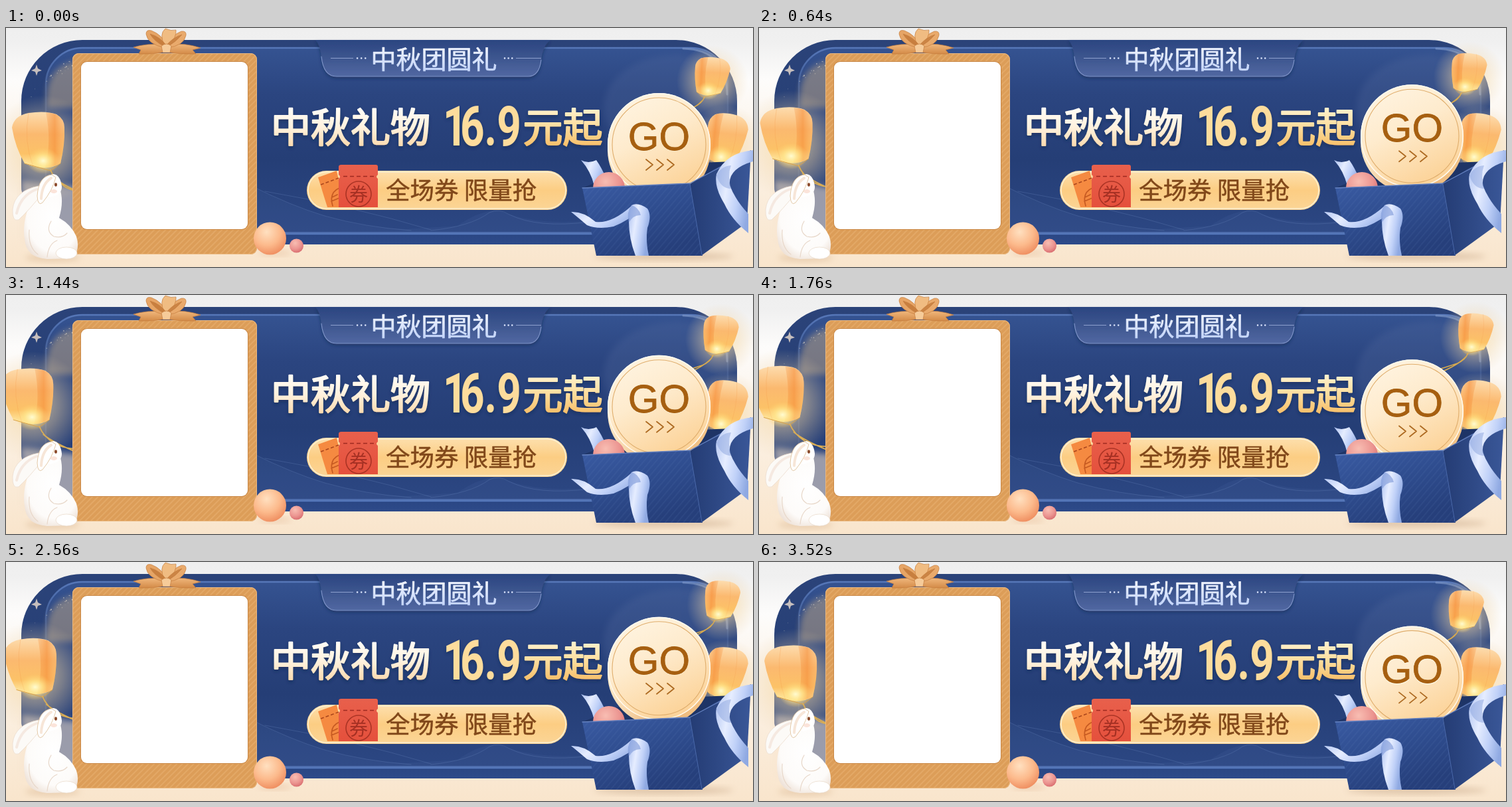
Animation, 1125 px wide and 360 px high, one loop 3600 ms. Source, as an HTML page:

```html
<!DOCTYPE html>
<html lang="zh-CN">
<head>
<meta charset="utf-8">
<title>中秋团圆礼</title>
<style>
  html, body { margin: 0; width: 100%; height: 100%; overflow: hidden; }
  svg { display: block; width: 1125px; height: 360px; }
  text { font-family: "Noto Sans CJK SC", "Noto Sans CJK", sans-serif; stroke-linejoin: round; }
  .big { font-size: 60px; stroke-width: 2.2px; }
  .num { font: 700 84px Roboto, sans-serif; }
  .go { font: 60px "Liberation Sans", Arial, sans-serif; text-anchor: middle; }
  .line { fill: none; stroke-linecap: round; stroke-linejoin: round; }
</style>
</head>
<body>
<svg viewBox="0 0 1125 360" xmlns="http://www.w3.org/2000/svg">
<defs>
  <linearGradient id="sky" x2="0" y2="1">
    <stop offset="0" stop-color="#efefef"/><stop offset=".06" stop-color="#f0f0f0"/>
    <stop offset=".22" stop-color="#fdfcfb"/><stop offset=".45" stop-color="#fcf4ea"/>
    <stop offset="1" stop-color="#f9e5cc"/>
  </linearGradient>
  <linearGradient id="rim" x2="0" y2="1">
    <stop offset="0" stop-color="#2b4379"/><stop offset=".5" stop-color="#263f76"/><stop offset="1" stop-color="#2d4a8a"/>
  </linearGradient>
  <linearGradient id="night" x2="0" y2="1">
    <stop offset="0" stop-color="#355391"/><stop offset=".25" stop-color="#2b4580"/>
    <stop offset=".6" stop-color="#253e76"/><stop offset="1" stop-color="#2c4783"/>
  </linearGradient>
  <linearGradient id="edge" x2="0" y2="1">
    <stop offset="0" stop-color="#5677b8"/><stop offset=".3" stop-color="#48659f" stop-opacity=".5"/>
    <stop offset=".8" stop-color="#48659f" stop-opacity=".3"/><stop offset="1" stop-color="#587bc0"/>
  </linearGradient>
  <linearGradient id="tab" x2="0" y2="1">
    <stop offset="0" stop-color="#2b4581"/><stop offset=".5" stop-color="#3d568f"/><stop offset="1" stop-color="#5268a2"/>
  </linearGradient>
  <linearGradient id="ice" gradientUnits="userSpaceOnUse" x1="0" y1="30" x2="0" y2="64">
    <stop offset="0" stop-color="#f0f4ff"/><stop offset="1" stop-color="#c5d6fb"/>
  </linearGradient>
  <linearGradient id="cream" gradientUnits="userSpaceOnUse" x1="0" y1="118" x2="0" y2="180">
    <stop offset="0" stop-color="#fffdf8"/><stop offset=".5" stop-color="#fff2df"/><stop offset="1" stop-color="#fbd9ac"/>
  </linearGradient>
  <linearGradient id="gold" gradientUnits="userSpaceOnUse" x1="0" y1="118" x2="0" y2="180">
    <stop offset="0" stop-color="#fff3d2"/><stop offset=".5" stop-color="#fddd9d"/><stop offset="1" stop-color="#f6bd66"/>
  </linearGradient>
  <linearGradient id="pill" x2="0" y2="1">
    <stop offset="0" stop-color="#fde0ae"/><stop offset=".5" stop-color="#fccd83"/><stop offset="1" stop-color="#fbd596"/>
  </linearGradient>
  <linearGradient id="red" x2="0" y2="1">
    <stop offset="0" stop-color="#e8604c"/><stop offset="1" stop-color="#e5503c"/>
  </linearGradient>
  <linearGradient id="face" x2=".5" y2="1">
    <stop offset="0" stop-color="#fff6e6"/><stop offset=".5" stop-color="#feebcd"/><stop offset="1" stop-color="#fcd49b"/>
  </linearGradient>
  <linearGradient id="side">
    <stop offset="0" stop-color="#fdeaca"/><stop offset=".5" stop-color="#eab273"/><stop offset="1" stop-color="#f3c68b"/>
  </linearGradient>
  <linearGradient id="paper" x2="0" y2="1">
    <stop offset="0" stop-color="#fddcae"/><stop offset=".4" stop-color="#fbb96f"/><stop offset=".75" stop-color="#fcc267"/><stop offset="1" stop-color="#fff0ae"/>
  </linearGradient>
  <linearGradient id="fold">
    <stop offset="0" stop-color="#f58e38" stop-opacity=".2"/><stop offset=".5" stop-color="#f58b36" stop-opacity=".6"/><stop offset="1" stop-color="#f9ab5d" stop-opacity=".2"/>
  </linearGradient>
  <radialGradient id="flame">
    <stop offset="0" stop-color="#fffbd0"/><stop offset=".45" stop-color="#ffe68c" stop-opacity=".75"/><stop offset="1" stop-color="#ffd070" stop-opacity="0"/>
  </radialGradient>
  <radialGradient id="glow">
    <stop offset="0" stop-color="#ffe5aa" stop-opacity=".75"/><stop offset=".5" stop-color="#f3d7a6" stop-opacity=".42"/><stop offset="1" stop-color="#ead2ac" stop-opacity="0"/>
  </radialGradient>
  <radialGradient id="peach" cx=".4" cy=".3" r=".75">
    <stop offset="0" stop-color="#ffe0c0"/><stop offset=".55" stop-color="#fcba8c"/><stop offset="1" stop-color="#ee8a5c"/>
  </radialGradient>
  <radialGradient id="pink" cx=".4" cy=".3" r=".75">
    <stop offset="0" stop-color="#f8bdb2"/><stop offset=".6" stop-color="#eb9490"/><stop offset="1" stop-color="#d7696c"/>
  </radialGradient>
  <radialGradient id="fur" cx=".55" cy=".4" r=".65">
    <stop offset="0" stop-color="#fff"/><stop offset=".75" stop-color="#fdfbf9"/><stop offset="1" stop-color="#efe3d9"/>
  </radialGradient>
  <linearGradient id="front" x2=".5" y2="1">
    <stop offset="0" stop-color="#3a5ba3"/><stop offset=".5" stop-color="#2f4d8f"/><stop offset="1" stop-color="#263f7b"/>
  </linearGradient>
  <linearGradient id="flank">
    <stop offset="0" stop-color="#243c74"/><stop offset="1" stop-color="#3a5798"/>
  </linearGradient>
  <linearGradient id="silk" x2="1" y2=".4">
    <stop offset="0" stop-color="#aabff0"/><stop offset=".4" stop-color="#e6edff"/><stop offset=".7" stop-color="#c0d1f8"/><stop offset="1" stop-color="#8fa9e2"/>
  </linearGradient>
  <linearGradient id="bow" x2="0" y2="1">
    <stop offset="0" stop-color="#f0b77c"/><stop offset="1" stop-color="#d38a47"/>
  </linearGradient>
  <pattern id="weave" width="6" height="6" patternUnits="userSpaceOnUse" patternTransform="rotate(-45)">
    <rect width="6" height="6" fill="#dc9d58"/><rect width="6" height="2" fill="#e3a866"/>
  </pattern>
  <pattern id="ribs" width="7" height="7" patternUnits="userSpaceOnUse" patternTransform="rotate(-50)">
    <rect width="7" height="1.5" fill="#6e8cc9" opacity=".12"/>
  </pattern>
  <filter id="soft" x="-30%" y="-30%" width="160%" height="160%"><feGaussianBlur stdDeviation="5"/></filter>
  <filter id="drop" x="-10%" y="-20%" width="120%" height="150%">
    <feDropShadow dx="0" dy="3" stdDeviation="2.5" flood-color="#13254f" flood-opacity=".55"/>
  </filter>
  <clipPath id="panel"><rect x="23" y="18" width="1078" height="308" rx="92"/></clipPath>
  <g id="lantern">
    <path d="M-39-20Q-36-38-14-42Q12-46 28-40Q40-33 40-20Q41 5 34 34Q12 47-20 34Q-34 10-39-20Z" fill="url(#paper)"/>
    <path d="M12-43Q28-42 34-35Q40-28 40-20Q41 5 34 34Q23 40 11 40Q21 0 12-43Z" fill="url(#fold)"/>
    <path d="M-14-42Q-22 0-7 39" class="line" stroke="#f39c4c" stroke-opacity=".3"/>
    <ellipse cx="8" cy="30" rx="25" ry="20" fill="url(#flame)"/>
    <path d="M-20 34L19 45L34 34" class="line" stroke="#d9a24a" stroke-width="1"/>
  </g>
</defs>

<rect width="1125" height="360" fill="url(#sky)"/>

<rect x="23" y="18" width="1078" height="308" rx="92" fill="url(#rim)"/>
<g clip-path="url(#panel)">
  <path d="M23 230H1101V326H23Z" fill="url(#rim)"/>
  <rect x="60" y="30" width="1027" height="280" rx="55" fill="url(#night)" stroke="url(#edge)" stroke-width="2.5"/>
  <path d="M1020 31Q1085 32 1086 100" class="line" stroke="#7f98ca" stroke-width="3" opacity=".65"/>
  <ellipse cx="1010" cy="120" rx="110" ry="80" fill="#566da0" opacity=".25" filter="url(#soft)"/>
  <path d="M61 105Q63 52 112 50V120H61Z" fill="#c4aa85" opacity=".5" filter="url(#soft)"/>
  <path d="M370 238Q430 268 480 283Q540 300 600 303L680 298Q720 270 748 277Q800 298 880 290V309H370Z" fill="#49659f" opacity=".17"/>
  <path d="M370 238Q430 268 480 283Q540 300 610 305M640 305Q700 299 728 278Q742 271 758 281Q800 302 880 292M390 246Q520 268 640 304" class="line" stroke="#6f8bc0" opacity=".28"/>
  <path d="M378 308.5H888" stroke="#5272b2" stroke-width="2.5"/>
  <g id="stars" fill="#f1e5d0"></g>
  <path d="M46 55L48 61L54 64L48 66L46 72L44 66L38 64L44 61Z" fill="#fbe9d5" opacity=".75"/>
</g>
<path d="M23 230V326H110V240Z" fill="#f7e4cf" opacity=".55" filter="url(#soft)"/>

<g filter="url(#drop)">
  <path d="M466 18Q473 25 475 43Q478 73 498 73H786Q803 73 806 48Q808 27 820 18Z" fill="url(#tab)"/>
</g>
<path d="M475 43Q478 73 498 73H786Q803 73 806 48" class="line" stroke="#7e94c9" stroke-width="1.2"/>
<path d="M489 45.500H523M768 45.500H806" stroke="#a9b9e2" stroke-opacity=".75"/>
<path d="M529 45.500h.1m6 0h.1m6 0h.1M751 45.500h.1m5.500 0h.1m5.500 0h.1" class="line" stroke="#dce6ff" stroke-width="2.5"/>
<text x="549.5" y="61" font-size="38" fill="url(#ice)" stroke="url(#ice)" stroke-width=".7">中秋团圆礼</text>

<g filter="url(#drop)">
  <text class="big" x="399" y="172" fill="url(#cream)" stroke="url(#cream)">中秋礼物</text>
  <text class="num" transform="translate(658 177) scale(.76 1)" fill="#fddc9c">1<tspan dx="-14">6.9</tspan></text>
  <text class="big" x="778.5" y="172" fill="url(#gold)" stroke="url(#gold)">元起</text>
</g>

<rect x="453" y="215" width="392" height="59" rx="29.5" fill="url(#pill)"/>
<rect x="455" y="217" width="388" height="55" rx="27.5" fill="none" stroke="#fff0d2" stroke-width="1.5"/>
<path d="M470 225L498 215L510 270H484Z" fill="#f58a41"/>
<path d="M474 236L501 226" stroke="#a9461d" stroke-width="1.5" stroke-dasharray="5 3"/>
<path d="M502 241Q486 248 492 268M499 251L491 255M502 256L490 261" class="line" stroke="#c65a22" stroke-width="1.7"/>
<path d="M505 206H557Q560 206 560 209V221Q556 224 560 227V270H501V227Q505 224 501 221V209Q501 206 505 206Z" fill="url(#red)"/>
<path d="M508 223.500H555" stroke="#9e2a20" stroke-width="1.700" stroke-dasharray="6 4"/>
<circle cx="531" cy="250" r="19" fill="none" stroke="#ab3425" stroke-width="1.6"/>
<text x="517" y="260.500" font-size="28" fill="#a53023">券</text>
<text x="572" y="258" font-size="36.5" fill="#81481a" stroke="#81481a" stroke-width=".5">全场券 限量抢</text>

<g id="left">
  <circle cx="56" cy="183" r="82" fill="url(#glow)"/>
  <path d="M67 214Q73 229 90 240Q103 247 124 248M73 226Q87 238 126 254" class="line" stroke="#d9ad55" stroke-width="1.800"/>
  <use href="#lantern" x="48" y="170"/>
</g>

<rect x="100" y="38" width="278" height="303" rx="9" fill="url(#weave)"/>
<rect x="100.500" y="38.500" width="277" height="302" rx="9" fill="none" stroke="#eab880"/>
<rect x="112" y="50" width="253" height="254" rx="10" fill="#c98745"/>
<rect x="113" y="51" width="251" height="252" rx="9" fill="#fff"/>

<g stroke="#c57d3e" stroke-width=".7" stroke-linejoin="round">
  <path d="M233 25Q212 23 192 29L203 33L200 39Q221 40 240 36Z" fill="url(#bow)"/>
  <path d="M247 25Q270 22 293 30L281 33L286 39Q263 40 240 36Z" fill="url(#bow)"/>
  <path d="M239 30Q213 24 211 9Q211 2 219 4Q235 10 242 26Z" fill="#e6a566"/>
  <path d="M242 30Q268 27 271 11Q272 4 264 5Q249 11 240 26Z" fill="#e9aa6c"/>
  <path d="M239 27Q230 9 240 1Q249 5 256 3Q257 14 245 28Z" fill="#f0bc82"/>
  <path d="M239 28Q223 20 217 9Q232 13 242 27Z" fill="#c87f3f"/>
  <path d="M243 28Q256 21 265 10Q251 14 241 27Z" fill="#cb8445"/>
  <path d="M234 27Q242 21 249 27L247 37H236Z" fill="#f6cb99"/>
</g>

<ellipse cx="70" cy="346" rx="42" ry="6" fill="#d9b894" opacity=".5" filter="url(#soft)"/>
<path d="M42 250Q23 290 28 318Q30 346 62 348L101 347Q112 333 106 314Q98 296 80 286Q87 263 82 245Z" fill="url(#fur)"/>
<path d="M49 238Q13 245 10 273Q9 292 19 289Q35 274 55 249Z" fill="#fcfaf7" stroke="#ecdccd" stroke-width=".8"/>
<path d="M46 243Q22 252 16 279" class="line" stroke="#f1ddcf" stroke-width="4" opacity=".55"/>
<path d="M50 244Q53 224 71 220Q82 221 84 239Q84 251 70 254Q53 257 50 244Z" fill="#fff"/>
<path d="M69 221Q49 223 47 253Q48 269 55 263Q70 245 75 225Z" fill="#fff" stroke="#e3c9a8" stroke-width="1"/>
<path d="M68 226Q54 235 53 257" class="line" stroke="#f3dcc8" stroke-width="4" opacity=".7"/>
<ellipse cx="75" cy="236" rx="2" ry="2.800" fill="#8b4a2b"/>
<ellipse cx="72" cy="246" rx="5" ry="3" fill="#f8cdbb" opacity=".55"/>
<path d="M35 304Q33 330 48 341M68 291Q59 306 72 314Q85 317 92 309M77 320Q64 325 62 345" class="line" stroke="#e8d8ca" stroke-width="1.200"/>
<ellipse cx="91" cy="339" rx="16" ry="9" fill="#fff" stroke="#e9d8c8" stroke-width=".7"/>

<ellipse cx="405" cy="339" rx="25" ry="4" fill="#d69b72" opacity=".3" filter="url(#soft)"/>
<circle cx="397.500" cy="317" r="24.500" fill="url(#peach)"/>
<circle cx="437.500" cy="328" r="10.500" fill="url(#pink)"/>

<circle cx="1085" cy="178" r="62" fill="url(#glow)"/>
<path d="M1071 205Q1066 215 1052 218" class="line" stroke="#d9ad55" stroke-width="1.500"/>
<use href="#lantern" transform="translate(1086 168) rotate(6) scale(-.77 .9)"/>
<g id="right">
  <circle cx="1064" cy="80" r="54" fill="url(#glow)"/>
  <path d="M1052 104Q1048 114 1036 119Q1024 123 1008 128M1049 109Q1038 121 1010 133" class="line" stroke="#d6a94f" stroke-width="1.600"/>
  <use href="#lantern" transform="translate(1064 74) rotate(3) scale(-.67 .69)"/>
</g>

<path d="M868 241L950 207L1118 200L1030 236Z" fill="#1e3466"/>
<path d="M866 199Q877 205 889 199Q897 210 905 229L886 238Q881 216 866 199Z" fill="url(#silk)"/>
<g id="coin">
  <path d="M906 175.500V184A77.500 77.500 0 0 0 1061 184V175.500Z" fill="url(#side)"/>
  <circle cx="983.500" cy="175.500" r="77.500" fill="url(#face)"/>
  <circle cx="983.500" cy="175.500" r="76.700" fill="none" stroke="#fffaf0" stroke-width="1.600"/>
  <circle cx="983.500" cy="175.500" r="70.500" fill="none" stroke="#dfad6c" stroke-width="1.100"/>
  <text class="go" x="983.500" y="185.200" fill="#fff5de">GO</text>
  <text class="go" x="983.500" y="184" fill="#a65f10" stroke="#a65f10" stroke-width=".8">GO</text>
  <path d="M964 198l10 8l-10 8m16-16l10 8l-10 8m16-16l10 8l-10 8" class="line" stroke="#ad6a22" stroke-width="1.800"/>
</g>
<circle cx="908" cy="241" r="24" fill="url(#pink)"/>

<ellipse cx="990" cy="344" rx="105" ry="6" fill="#b99676" opacity=".4" filter="url(#soft)"/>
<path d="M1030 235L1066 213L1122 184L1116 293L1047 343Z" fill="url(#flank)"/>
<path d="M868 241L1030 234L1049 343H889Z" fill="url(#front)"/>
<path d="M868 241L1030 234L1049 343H889Z" fill="url(#ribs)"/>
<path d="M868 241L1030 234L1120 186" class="line" stroke="#6582c0" stroke-width="1.300"/>
<path d="M1030 235L1048 342" stroke="#4967a8"/>
<path d="M1125 184Q1084 188 1070 220Q1066 239 1082 265Q1093 289 1118 309V280Q1099 260 1090 237Q1087 212 1125 201Z" fill="url(#silk)"/>
<path d="M1070 222Q1077 208 1092 207Q1086 222 1092 242Q1076 242 1070 222Z" fill="#91aae0" opacity=".55"/>
<path d="M851 277Q870 276 888 292Q912 295 942 268L961 270Q936 291 915 299Q891 304 875 297Q861 285 851 277Z" fill="url(#silk)"/>
<path d="M942 267Q952 262 966 272Q973 283 966 301Q963 320 968 343H948Q938 317 938 291Z" fill="url(#silk)"/>
<path d="M942 267Q953 270 956 282Q945 281 938 293Q934 277 942 267Z" fill="#839dda" opacity=".65"/>
</svg>
<script>
  const LOOP = 3600, STEP = 80;
  const parts = [
    { id: 'left', dx: -21, dy: -20, peak: 1800, span: 3600 },
    { id: 'right', dx: 20, dy: -20.5, peak: 2240, span: 3600 },
    { id: 'coin', dx: 0, dy: -18, peak: 900, span: 1800 }
  ].map(p => ({ ...p, el: document.getElementById(p.id) }));

  // Linear rise to the peak, then linear return.
  const swing = (t, peak, span) => t < peak ? t / peak : (span - t) / (span - peak);

  let seed = 7;
  const rnd = () => (seed = seed * 16807 % 2147483647) / 2147483647;
  const stars = document.getElementById('stars');
  for (let i = 0; i < 26; i++) {
    const dot = document.createElementNS(stars.namespaceURI, 'circle');
    const x = 38 + rnd() * 70;
    const attrs = { cx: x, cy: 92 - (x - 35) * .75 + rnd() * 15, r: .4 + rnd() * .7, opacity: .3 + rnd() * .5 };
    for (const k in attrs) dot.setAttribute(k, attrs[k]);
    stars.append(dot);
  }

  let start;
  function draw(now) {
    start ??= now;
    const t = Math.floor((now - start) % LOOP / STEP) * STEP;
    for (const p of parts) {
      const k = swing(t % p.span, p.peak, p.span);
      p.el.setAttribute('transform', `translate(${p.dx * k} ${p.dy * k})`);
    }
    requestAnimationFrame(draw);
  }
  requestAnimationFrame(draw);
</script>
</body>
</html>
```
